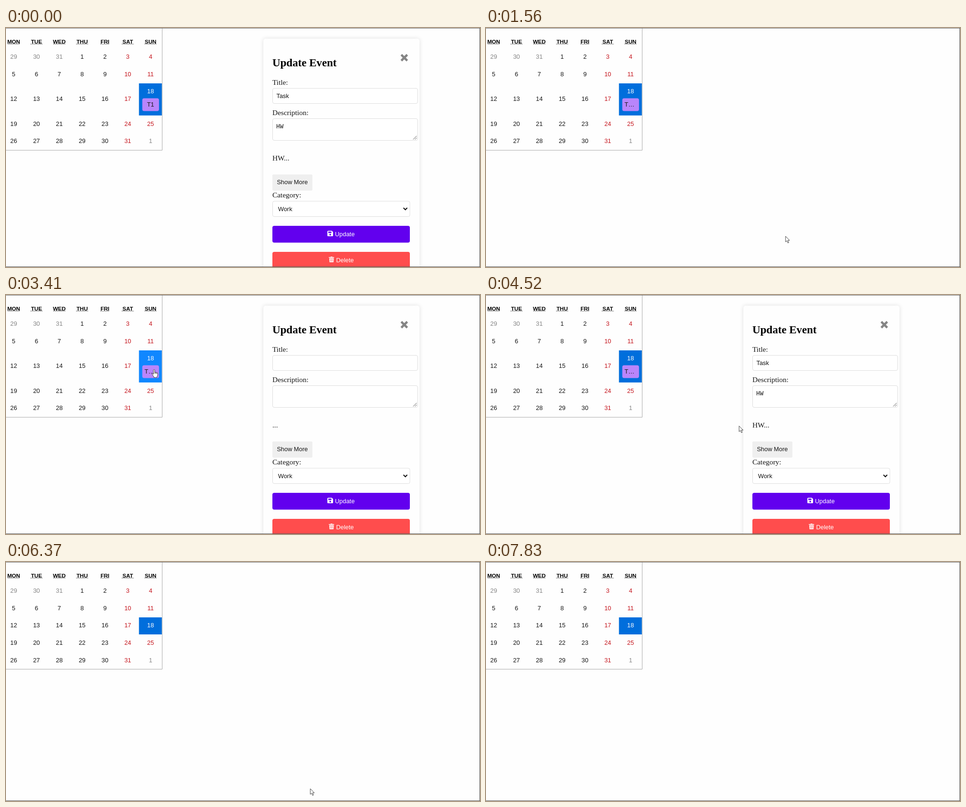
An HTML page for the animation above (8020 ms loop, 1000 px wide and 505 px high).

```html
<!DOCTYPE html>
<html lang="en">
<head>
<meta charset="utf-8">
<title>Calendar event editor</title>
<style>
  html, body { margin: 0; width: 100%; height: 100%; overflow: hidden; background: #fefefe; }
  svg { display: block; width: 100%; height: 100%; }
  text { font: 12.9px "Liberation Sans", Arial, sans-serif; fill: #151515; }
  .day, .weekday, .mid { text-anchor: middle; }
  text.weekday { font-size: 11.6px; font-weight: bold; fill: #000; }
  text.weekend { fill: #c4141c; }
  text.other { fill: #858585; }
  text.white { fill: #fff; }
  text.serif { font: 15.41px "Liberation Serif", "Times New Roman", serif; }
  text.heading { font: bold 23.12px "Liberation Serif", "Times New Roman", serif; fill: #000; }
  text.mono { font: 12.84px "Liberation Mono", "Courier New", monospace; }
  .field { fill: #fff; stroke: #dedede; }
  .panel { fill: #fefefe; filter: drop-shadow(0 0 4.5px rgba(0, 0, 0, .12)); }
</style>
</head>
<body>
<svg viewBox="0 0 1000 505">
  <g id="calendar"></g>

  <g id="form">
    <rect class="panel" x="543" y="22.5" width="329.5" height="520" rx="5"/>
    <text class="heading" x="562" y="81">Update Event</text>
    <path d="M834 56.5l12.5 12.5m0-12.5l-12.5 12.5" stroke="#858585" stroke-width="4.6"/>

    <text class="serif" x="562" y="120">Title:</text>
    <rect class="field" x="562.5" y="127.5" width="306" height="32" rx="3.5"/>
    <text id="title" x="570.5" y="147.7"></text>

    <text class="serif" x="562" y="184">Description:</text>
    <rect class="field" x="562.5" y="191.5" width="306" height="46" rx="3.5"/>
    <text id="description" class="mono" x="570" y="212"></text>
    <path d="M859 235.5l7.5-7.5m-3.5 7.5l3.5-3.5" stroke="#555" fill="none"/>

    <text id="preview" class="serif" x="562" y="280"></text>
    <rect x="562" y="309.5" width="84.5" height="34" rx="2" fill="#efefef"/>
    <text x="571.5" y="330.4">Show More</text>

    <text class="serif" x="562" y="358">Category:</text>
    <rect class="field" x="562.5" y="366" width="289.5" height="32.5" rx="3.5"/>
    <text x="574" y="386.7">Work</text>
    <path d="M838.5 380l4 4 4-4" fill="none" stroke="#111" stroke-width="2"/>

    <rect x="562" y="418" width="290" height="35.5" rx="4" fill="#6200ee"/>
    <path fill="#fff" fill-rule="evenodd" d="M679.5 428.5h8l2.5 2.5v7.5q0 1.5-1.5 1.5h-9q-1.5 0-1.5-1.5v-8.500q0-1.500 1.500-1.500zM680 430.300v3h6.500v-3zM684 434.800a1.800 1.800 0 1 0 .01 0z"/>
    <text class="white" x="694" y="439.800">Update</text>

    <rect x="562" y="473" width="290" height="45" rx="4" fill="#ff4d4d"/>
    <path fill="#fff" d="M681 484h3.500l.7-1h3l.7 1h3.300v1.600H681zM682 486.400h9.500l-.6 8.600h-8.300z"/>
    <path stroke="#ff4d4d" stroke-width=".8" d="M684.600 488v5.500m2.200-5.500v5.500m2.200-5.500v5.500"/>
    <text class="white" x="696.500" y="495">Delete</text>
  </g>

  <path d="M0 .5H1000" stroke="#777"/>
  <path d="M999.500 0V505M0 504.500H1000" stroke="#555"/>

  <g id="cursor" fill="#fff" stroke="#333" stroke-width=".9" stroke-linejoin="round">
    <path id="arrow" d="M0 0V12l2.800-2.500 2 4.700 2-.9-2-4.500h3.700z"/>
    <path id="hand" d="M-1.500 9V1.200Q-1.300 0 0 0t1.300 1.200V6q1.200-1 2.200.3 1.300-.8 2.100.4 1.800-.4 1.900 1.400v3.400q-.2 2-1.500 3.400v2H-.5v-1.500L-4.300 10q-.5-1.400.8-1.600.9.100 2 1.800zM1.300 6v3m2.200-2.500V9m2.100-2V9.300"/>
  </g>
</svg>

<script>
const LOOP = 8020;
const SAVED = 1500, OPENED = 3410, LOADED = 3500, DELETED = 6370;
const ENTER = 160, EXIT = 7610;

// Cursor hotspot: time, x, y
const route = [
  [160, 700, 512], [860, 634, 460], [980, 634, 460], [1070, 627, 450],
  [1350, 632, 440], [1700, 632, 440], [2230, 522, 463.5], [2410, 377, 264],
  [2810, 377, 264], [3210, 312.5, 157.5], [3500, 312.5, 157.5],
  [3960, 470, 230], [4150, 470, 230], [4900, 600, 325], [5000, 600, 325],
  [5230, 592, 330], [5780, 592, 330], [6170, 642, 479], [6460, 642, 479],
  [7150, 560, 300], [7610, 395, -20]
];

const $ = id => document.getElementById(id);
const label = (x, y, cls, text) => `<text x="${x}" y="${y}" class="${cls}">${text}</text>`;
const show = (id, visible) => $(id).setAttribute('visibility', visible ? 'visible' : 'hidden');
const inside = (p, x, y, w, h) => p.x >= x && p.x <= x + w && p.y >= y && p.y <= y + h;

function cursorAt(t) {
  const i = Math.max(1, route.findIndex(key => key[0] >= t));
  const [t0, x0, y0] = route[i - 1], [t1, x1, y1] = route[i];
  const u = Math.min(1, Math.max(0, (t - t0) / (t1 - t0)));
  const k = u * u * (3 - 2 * u);
  return { x: x0 + (x1 - x0) * k, y: y0 + (y1 - y0) * k };
}

function drawCalendar(event, hovered) {
  const extra = event ? 31.8 : 0;
  const columnX = c => 16.2 + c * 48.13;
  let out = `<path d="M0 ${226.5 + extra}H329.5V0" fill="none" stroke="#aaa"/>
    <rect x="280.500" y="117" width="48.200" height="${36 + extra}" fill="${hovered ? '#1087ff' : '#006edc'}"/>`;

  ['MON', 'TUE', 'WED', 'THU', 'FRI', 'SAT', 'SUN'].forEach((name, c) => {
    const x = columnX(c), half = name === 'FRI' ? 9.5 : 12.5;
    out += label(x, 32.8, 'weekday', name) +
      `<path d="M${x - half} 34H${x + half}" stroke="#000" stroke-width="1.200" stroke-dasharray="1.200"/>`;
  });

  for (let i = 0; i < 35; i++) {
    const row = Math.floor(i / 7), col = i % 7, selected = i === 20;
    const shift = row > 2 ? extra : row === 2 && !selected ? extra / 2 : 0;
    const day = i < 3 ? 29 + i : i === 34 ? 1 : i - 2;
    const tone = selected ? 'white' : i < 3 || i === 34 ? 'other' : col > 4 ? 'weekend' : '';
    out += label(columnX(col), 65.3 + row * 36.55 + shift, 'day ' + tone, day);
  }

  if (event) {
    out += '<rect x="287.500" y="148.500" width="35.300" height="27" rx="4" fill="#b985fb"/>' +
      (event === 'T1' ? label(305, 166.3, 'mid', event) : label(292.3, 166.3, '', event));
  }
  $('calendar').innerHTML = out;
}

let drawn = '';

function render(t) {
  const p = cursorAt(t);
  const active = t >= ENTER && t < EXIT;
  const formOpen = t < SAVED || (t >= OPENED && t < DELETED);
  const filled = t < SAVED || t >= LOADED;
  const event = t < SAVED ? 'T1' : t < DELETED ? 'T…' : '';
  const overDay = active && inside(p, 280.5, 117, 48.2, event ? 67.8 : 36);

  const state = event + overDay;
  if (state !== drawn) drawCalendar(event, overDay);
  drawn = state;

  show('form', formOpen);
  $('title').textContent = filled ? 'Task' : '';
  $('description').textContent = filled ? 'HW' : '';
  $('preview').textContent = filled ? 'HW...' : '...';

  const overButton = formOpen && (inside(p, 562, 309, 85, 35) ||
    inside(p, 562, 418, 290, 36) || inside(p, 562, 473, 290, 40));
  const pointing = overDay || overButton;
  $('cursor').setAttribute('transform', `translate(${p.x} ${p.y})`);
  show('arrow', active && !pointing);
  show('hand', active && pointing);
}

function tick() {
  render(performance.now() % LOOP);
  requestAnimationFrame(tick);
}
tick();
</script>
</body>
</html>
```
